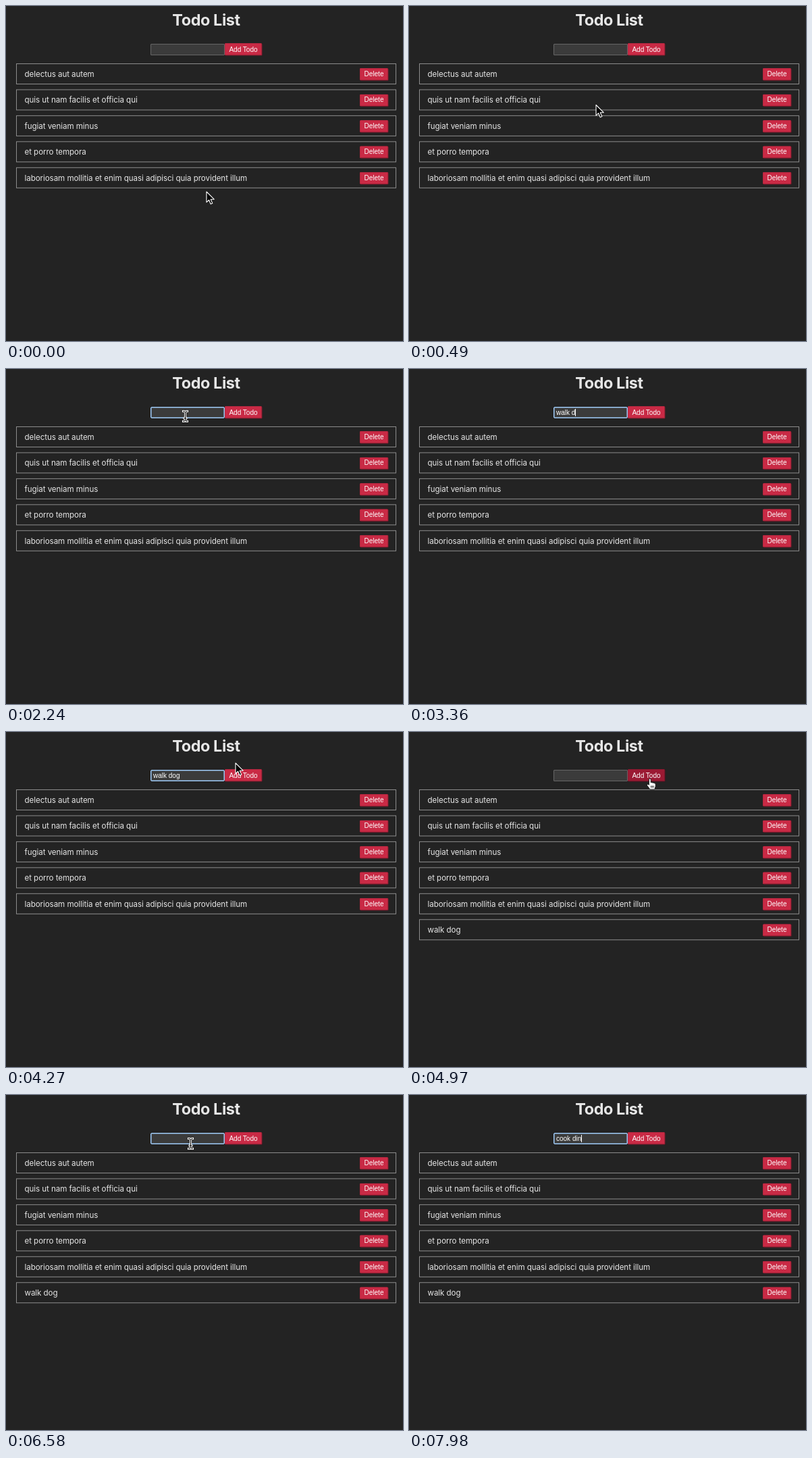
Write an HTML page that moves like this. It is 588 px wide and 496 px high and loops after 8000 ms.

```html
<!DOCTYPE html>
<html lang="en">
<head>
<meta charset="utf-8">
<title>Todo List</title>
<style>
html, body { margin: 0; width: 100%; height: 100%; overflow: hidden; background: #232323; }
#stage { position: relative; width: 588px; height: 496px; overflow: hidden; background: #232323; color: #e6e6e6; font: 11.6px Inter, sans-serif; }
#stage * { box-sizing: border-box; }
h1 { position: absolute; left: 0; top: 6px; width: 593px; margin: 0; font-size: 23.4px; line-height: 30px; font-weight: 700; text-align: center; letter-spacing: -.4px; }
.row { position: absolute; left: 15px; top: 85px; width: 563px; height: 31px; padding-left: 11.5px; border: 1px solid #8c8c8c; line-height: 30px; letter-spacing: -.07px; white-space: pre; }
.btn { position: absolute; height: 18px; border: 1px solid; border-color: #b82840 #a02338 #a02338 #b82840; border-radius: 1.5px; background: #c92a45; box-shadow: .5px .5px 1px #7a1a2c; color: #fff; font: 10px/16px "Liberation Sans", Arial, sans-serif; letter-spacing: 0; text-align: center; }
.row .btn { left: 508px; top: 6px; width: 42px; }
#add { left: 324px; top: 55px; width: 55px; line-height: 17px; }
#add.hover { border-color: #8e1930 #7c172b #7c172b #8e1930; background: #9b1a33; box-shadow: .5px .5px 1px #5c1122; }
#field { position: absolute; left: 214px; top: 56px; width: 110px; height: 17px; padding-left: 3px; border: 1px solid #666; border-radius: 1px; background: #3b3b3b; color: #fff; font: 10px/15px "Liberation Sans", Arial, sans-serif; white-space: pre; }
#field.focus { border-color: #9fcbf8; box-shadow: inset 0 0 0 .5px #9fcbf8; border-radius: 2px; }
#caret { display: inline-block; width: 1px; height: 11px; background: #fff; vertical-align: -2px; }
#pointer { position: absolute; left: 0; top: 0; width: 30px; height: 30px; overflow: visible; }
</style>
</head>
<body>
<div id="stage">
  <h1>Todo List</h1>
  <div id="field"><span id="typed"></span><span id="caret"></span></div>
  <div id="add" class="btn">Add Todo</div>
  <svg id="pointer">
    <path id="arrow" d="M0 0V15.6L3.6 12.2L6.2 18.2L8.8 17.1L6.2 11.2H11.2Z" fill="#000" stroke="#fff" stroke-width="1.1" stroke-linejoin="round"/>
    <g id="beam" fill="none" stroke-linecap="square">
      <path d="M-3 -7.5Q0 -7.5 0 -5.5V5.5Q0 7.5 -3 7.5M3 -7.5Q0 -7.5 0 -5.5M0 5.5Q0 7.5 3 7.5M-1.5 3H1.5" stroke="#fff" stroke-width="3"/>
      <path d="M-3 -7.5Q0 -7.5 0 -5.5V5.5Q0 7.5 -3 7.5M3 -7.5Q0 -7.5 0 -5.5M0 5.5Q0 7.5 3 7.5M-1.5 3H1.5" stroke="#000" stroke-width="1"/>
    </g>
    <g id="hand" stroke="#111" stroke-width=".9" stroke-linejoin="round">
      <path d="M-1.6 9V1Q-1.6 -.4 -.2 -.4T1.2 1V5.4Q2.4 4.4 3.6 5.7Q4.9 4.9 5.9 6.2Q8.2 5.7 8.2 8V11L6.8 15.4H-.2Q-1.6 12.9 -4 10.2Q-5 8.5 -3.4 7.8Q-2.4 7.8 -1.6 9Z" fill="#fff"/>
      <path d="M1.6 10V13M3.4 10V13M5.2 10V13" fill="none"/>
    </g>
  </svg>
</div>
<script>
const LOOP = 8000, TICK = 70;
const $ = id => document.getElementById(id);
const within = (t, a, b) => t >= a && t < b;

const items = ['delectus aut autem', 'quis ut nam facilis et officia qui', 'fugiat veniam minus',
  'et porro tempora', 'laboriosam mollitia et enim quasi adipisci quia provident illum', 'walk dog'];
const rows = items.map((text, i) => {
  const row = document.createElement('div');
  row.className = 'row';
  row.style.transform = `translateY(${38.45 * i}px)`;
  row.textContent = text;
  const del = document.createElement('div');
  del.className = 'btn';
  del.textContent = 'Delete';
  row.append(del);
  $('stage').insertBefore(row, $('pointer'));
  return row;
});

// Each phrase with the time of every key press and the time it is cleared.
const phrases = [
  { text: 'walk dog', keys: [2520, 2590, 2660, 2730, 3010, 3360, 3430, 3570], end: 4970 },
  { text: 'cook din', keys: [6930, 7000, 7140, 7350, 7490, 7630, 7700, 7980], end: LOOP }
];
const typedAt = t => {
  const p = phrases.find(p => t < p.end);
  return p ? p.text.slice(0, p.keys.filter(k => k <= t).length) : '';
};

// Pointer stops: time, x, y; "ease" smooths the way to the next stop.
const stops = [
  [0, 297, 275, 'ease'], [840, 265, 69], [1120, 265, 69], [1190, 265.5, 70],
  [3920, 265.5, 70], [4060, 296, 60], [4270, 340, 46], [4340, 347, 45],
  [4480, 353, 58], [4620, 357, 69.5], [5320, 357, 69.5, 'ease'], [5600, 273.5, 72], [LOOP, 273.5, 72]
];
const looks = [[0, 'arrow'], [1190, 'beam'], [2450, ''], [3990, 'beam'], [4060, 'arrow'],
  [4480, 'hand'], [5460, 'beam'], [6860, '']];

function pointerAt(t) {
  const i = stops.findIndex((s, n) => t < stops[n + 1][0]);
  const [t0, x0, y0, ease] = stops[i], [t1, x1, y1] = stops[i + 1];
  let k = (t - t0) / (t1 - t0);
  if (ease) k = k * k * (3 - 2 * k);
  return [x0 + (x1 - x0) * k, y0 + (y1 - y0) * k];
}

function draw() {
  const t = Math.floor(performance.now() % LOOP / TICK) * TICK;
  const focus = within(t, 1680, 4970) || t >= 6020;
  const blink = within(t, 2240, 2450) || within(t, 4060, 4620) || within(t, 6580, 6860);
  $('field').classList.toggle('focus', focus);
  $('typed').textContent = typedAt(t);
  $('caret').style.visibility = focus && !blink ? 'visible' : 'hidden';
  $('add').classList.toggle('hover', within(t, 4480, 5460));
  rows[5].style.display = t >= 4970 ? '' : 'none';

  const [x, y] = pointerAt(t);
  const look = looks.filter(l => l[0] <= t).pop()[1];
  $('pointer').style.transform = `translate(${x}px, ${y}px)`;
  for (const id of ['arrow', 'beam', 'hand']) $(id).style.display = id === look ? '' : 'none';
  requestAnimationFrame(draw);
}
draw();
</script>
</body>
</html>
```
